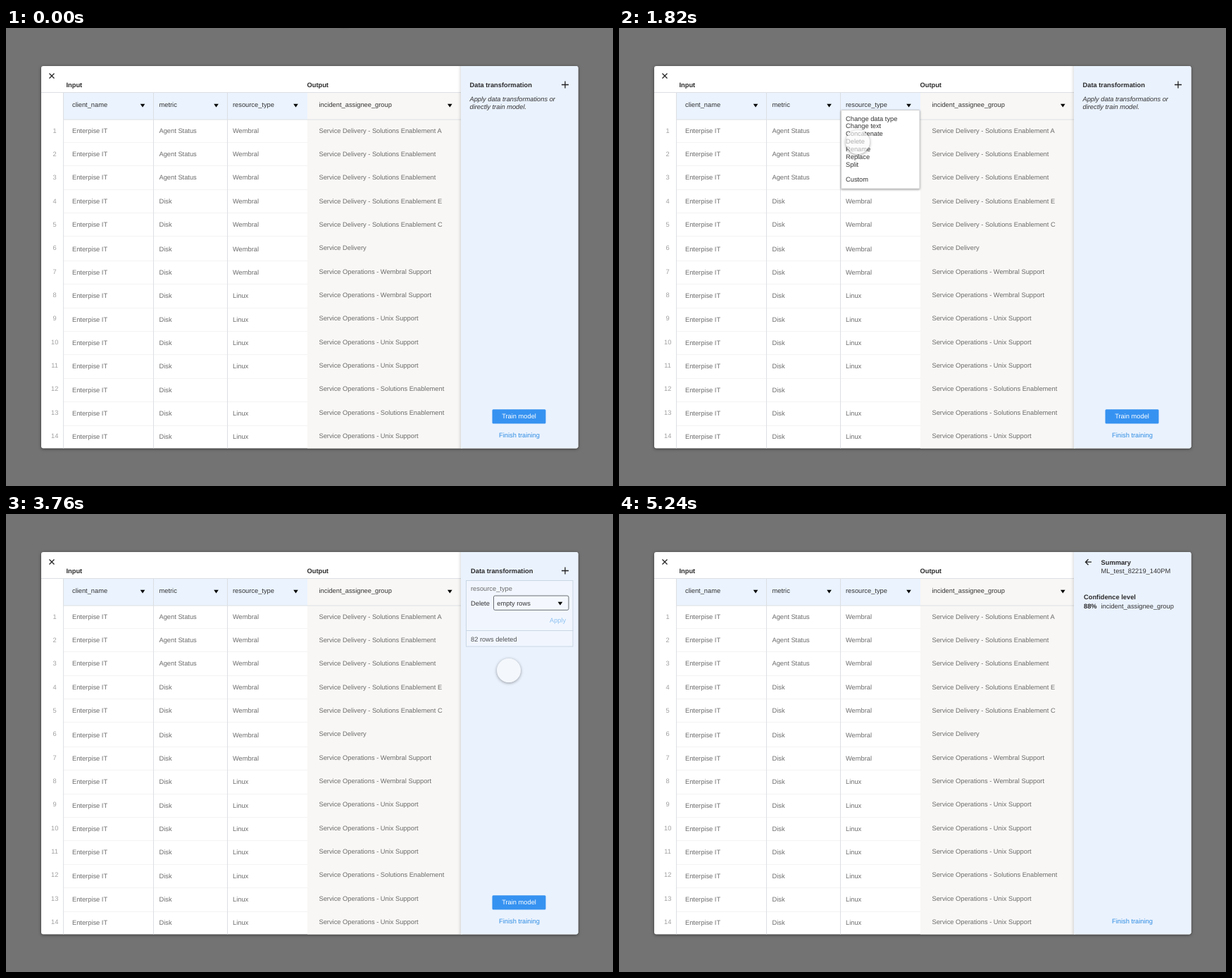
An HTML page for the animation above (5740 ms loop, 862 px wide and 650 px high).

```html
<!DOCTYPE html>
<html lang="en">
<head>
<meta charset="utf-8">
<title>Data transformation</title>
<style>
  html, body { margin: 0; width: 100%; height: 100%; overflow: hidden; background: #737373; }
  #stage { position: relative; width: 862px; height: 650px; overflow: hidden; }
  svg { display: block; }
  text {
    font: 9.3px "Liberation Sans", Arial, Helvetica, sans-serif;
    fill: #333;
    text-rendering: geometricPrecision;
    white-space: pre;
  }
  .bold { font-weight: bold; fill: #2b2b2b; }
  .italic { font-style: italic; }
  .cell { fill: #6b6b6b; }
  .number { fill: #a0a0a0; text-anchor: middle; }
  .link { fill: #2f8de4; }
  .middle { text-anchor: middle; }
  .icon { fill: none; stroke: #222; stroke-width: 1.3; }
  .rule { stroke: #dcdfe3; }
  .row-rule { stroke: #f3f3f3; }
  .card { fill: #f1f6fe; stroke: #c9d6e4; }

  #modal { filter: drop-shadow(0 1px 2px rgba(0, 0, 0, .5)); }
  #side { filter: drop-shadow(-1px 0 2px rgba(0, 0, 0, .16)); }
  #menu rect { fill: #fff; stroke: #cfcfcf; filter: drop-shadow(0 1px 1.5px rgba(0, 0, 0, .35)); }

  .anim { animation: 5740ms linear infinite both; }
  #menu { animation-name: menu; }
  #intro { animation-name: intro; }
  #transform { animation-name: transform; }
  #controls { animation-name: leave; }
  #summary { animation-name: arrive; }
  .before { animation-name: before; }
  .after { animation-name: after; }
  .apply { animation-name: apply; }

  @keyframes menu { 0%, 12.195% { opacity: 0 } 15.331%, 32.056% { opacity: 1 } 34.843%, 100% { opacity: 0 } }
  @keyframes intro { 0%, 32.056% { opacity: 1 } 34.843%, 100% { opacity: 0 } }
  @keyframes transform { 0%, 32.056% { opacity: 0 } 34.843%, 76.655% { opacity: 1 } 80.139%, 100% { opacity: 0 } }
  @keyframes leave { 0%, 76.655% { opacity: 1 } 80.139%, 100% { opacity: 0 } }
  @keyframes arrive { 0%, 76.655% { opacity: 0 } 80.139%, 100% { opacity: 1 } }
  @keyframes before { 0%, 56.446% { opacity: 1 } 59.930%, 100% { opacity: 0 } }
  @keyframes after { 0%, 56.446% { opacity: 0 } 59.930%, 100% { opacity: 1 } }
  @keyframes apply { 0%, 56.446% { opacity: 1 } 59.930%, 100% { opacity: .5 } }

  #pointer {
    position: absolute; left: -17px; top: -17px; width: 34px; height: 34px;
    border-radius: 50%;
    background: rgba(250, 250, 250, .62);
    box-shadow: 0 1px 4px rgba(0, 0, 0, .38);
    animation-name: pointer;
  }
  @keyframes pointer {
    0%, .348% { transform: translate(480px, -20px); animation-timing-function: ease }
    7.666% { transform: translate(410px, 122px) }
    19.164% { transform: translate(410px, 122px); animation-timing-function: ease }
    22.300% { transform: translate(394px, 131px) }
    25.087% { transform: translate(394px, 131px); animation-timing-function: ease }
    30.662% { transform: translate(339px, 162px) }
    40.070% { transform: translate(339px, 162px); animation-timing-function: cubic-bezier(.3, .1, .6, .75) }
    45.296% { transform: translate(618px, 131px); animation-timing-function: cubic-bezier(.33, .42, .67, .82) }
    49.129% { transform: translate(740px, 142px); animation-timing-function: cubic-bezier(.3, .66, .6, 1) }
    55.052% { transform: translate(786px, 153px) }
    62.718% { transform: translate(786px, 153px); animation-timing-function: ease }
    65.505% { transform: translate(714px, 222px) }
    68.990% { transform: translate(714px, 222px); animation-timing-function: ease }
    75.958% { transform: translate(720px, 553px) }
    83.624% { transform: translate(720px, 553px); opacity: 1; animation-timing-function: ease }
    87.800% { opacity: 1 }
    91.289%, 100% { transform: translate(823px, 574px); opacity: 0 }
  }
</style>
</head>
<body>
<div id="stage">
<svg width="862" height="650" viewBox="0 0 862 650">
  <defs>
    <path id="caret" d="M-3.3 -2.2H3.3L0 2.4Z"/>
    <clipPath id="frame"><rect x="50" y="54" width="762.5" height="542.5" rx="3"/></clipPath>
  </defs>
  <rect id="modal" x="50" y="54" width="762.5" height="542.5" rx="3" fill="#fff"/>
  <g clip-path="url(#frame)">
    <rect x="82" y="92" width="346" height="38" fill="#eaf3fe"/>
    <rect x="428" y="92" width="220" height="505" fill="#f8f7f5"/>
    <g id="table"></g>
    <path class="rule" d="M50 91.5H646M82 130H646M81.5 92V597M209.5 92V597M314.5 92V597"/>
    <rect id="side" x="646" y="50" width="170" height="550" fill="#eaf2fd"/>
  </g>

  <path class="icon" d="M61.5 64.5l7 7m0 -7l-7 7"/>
  <text class="bold" x="85.5" y="84">Input</text>
  <text class="bold" x="427.5" y="84">Output</text>
  <text x="94" y="112">client_name</text>
  <text x="217.5" y="112">metric</text>
  <text x="322" y="112">resource_type</text>
  <text x="444.5" y="112">incident_assignee_group</text>
  <use href="#caret" x="194" y="110"/>
  <use href="#caret" x="298.5" y="110"/>
  <use href="#caret" x="411.5" y="110"/>
  <use href="#caret" x="630.3" y="110"/>

  <g id="menu" class="anim"><rect x="315.5" y="116.5" width="111.5" height="111.5" rx="1"/></g>

  <g id="intro" class="anim">
    <text class="bold" x="658.5" y="84">Data transformation</text>
    <text class="italic" x="658.5" y="103.5">Apply data transformations or</text>
    <text class="italic" x="658.5" y="114.5">directly train model.</text>
  </g>

  <g id="transform" class="anim">
    <text class="bold" x="660" y="84">Data transformation</text>
    <rect class="card" x="653.5" y="94.5" width="151.5" height="71"/>
    <text class="cell" x="660" y="109">resource_type</text>
    <text x="660" y="129.5">Delete</text>
    <rect x="692.5" y="116" width="106.5" height="20.3" rx="2" fill="#f4f8fe" stroke="#6c7075"/>
    <text x="697.3" y="129.5">empty rows</text>
    <use href="#caret" x="787" y="127"/>
    <text class="link anim apply" x="772" y="154">Apply</text>
    <g class="anim after">
      <rect class="card" x="653.5" y="165.5" width="151.5" height="22.5"/>
      <text x="660" y="180.5" fill-opacity=".85">82 rows deleted</text>
    </g>
  </g>

  <g id="controls" class="anim">
    <path class="icon" d="M789 80.5h10m-5 -5v10"/>
    <rect x="690.5" y="541.2" width="76" height="20.2" rx="1.5" fill="#3692f1"/>
    <text class="middle" x="728.5" y="554.3" style="fill:#fff">Train model</text>
  </g>

  <g id="summary" class="anim">
    <path class="icon" d="M671 68.2h-8.5m4 -4l-4 4l4 4"/>
    <text class="bold" x="684.5" y="71.7">Summary</text>
    <text x="684.5" y="83.5">ML_test_82219_140PM</text>
    <text class="bold" x="660" y="121">Confidence level</text>
    <text class="bold" x="660" y="134">88%</text>
    <text x="684.5" y="134">incident_assignee_group</text>
  </g>
  <text class="link middle" x="729" y="580.6">Finish training</text>
</svg>
<div id="pointer" class="anim"></div>
</div>
<script>
  const SVG = "http://www.w3.org/2000/svg";
  const table = document.getElementById("table");
  const menu = document.getElementById("menu");

  function add(parent, tag, attrs, content = "") {
    const node = document.createElementNS(SVG, tag);
    for (const key in attrs) node.setAttribute(key, attrs[key]);
    node.textContent = content;
    parent.append(node);
  }

  function cell(x, y, content, extra = "") {
    add(table, "text", { x, y, class: "cell " + extra }, content);
  }

  const enablement = "Service Delivery - Solutions Enablement";
  const operations = team => "Service Operations - " + team;
  const unix = operations("Unix Support");
  const desktop = operations("Wembral Support");
  const solutions = operations("Solutions Enablement");
  const outputs = [
    enablement + " A", enablement, enablement, enablement + " E", enablement + " C",
    "Service Delivery", desktop, desktop, unix, unix, unix, solutions, solutions, unix
  ];

  outputs.forEach((output, i) => {
    const y = 148.5 + 33.36 * i;
    const inputY = y + (i > 4 ? 1.2 : 0);
    add(table, "path", { class: "row-rule", d: `M82 ${Math.round(inputY + 13.5) + .5}H428` });
    add(table, "text", { x: 69.2, y, class: "number" }, i + 1);
    cell(94, inputY, "Enterpise IT");
    cell(217.5, inputY, i < 3 ? "Agent Status" : "Disk");
    cell(322, inputY, i < 7 ? "Wembral" : "Linux", i === 11 ? "anim after" : "");
    cell(444.5, y, output, i === 12 ? "anim before" : "");
    if (i === 12) cell(444.5, y, unix, "anim after");
  });

  ["Change data type", "Change text", "Concatenate", "Delete", "Rename", "Replace", "Split", "", "Custom"]
    .forEach((label, i) => add(menu, "text", { x: 322, y: 131.5 + 10.85 * i }, label));
</script>
</body>
</html>
```
